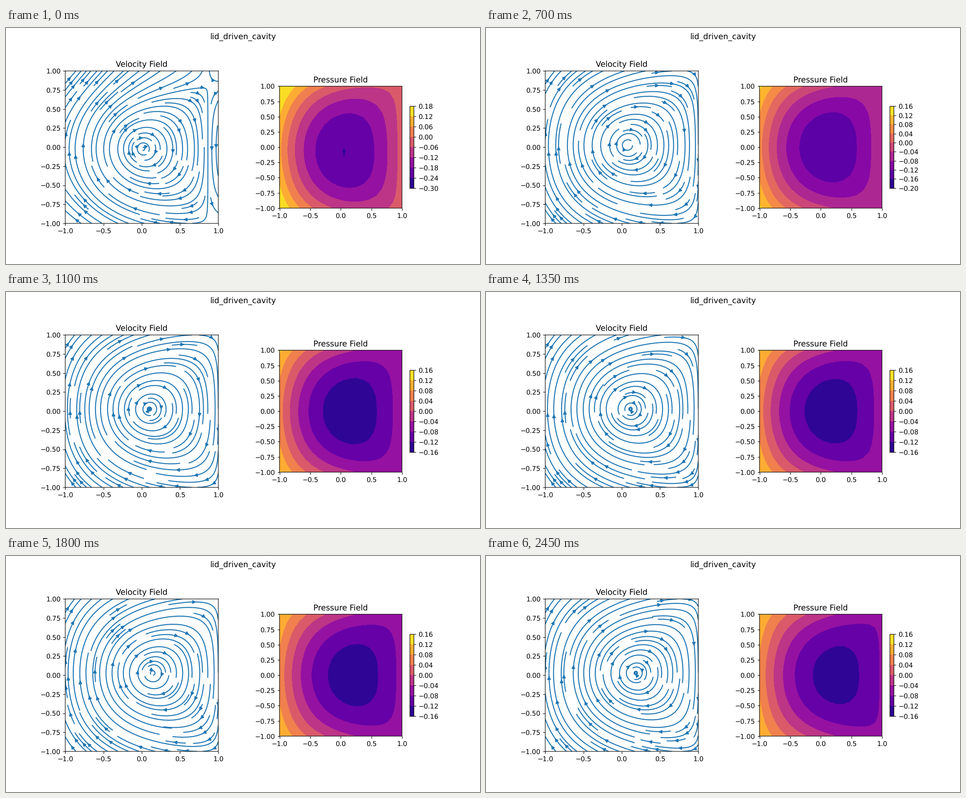
These frames come from a looping animation (1058x529 px, 2500 ms). A matplotlib script:

```python
import numpy as np
import matplotlib.pyplot as plt
from matplotlib.animation import FuncAnimation

FRAMES, INTERVAL = 50, 50
axis = np.linspace(-1, 1, 20)
X, Y = np.meshgrid(axis, axis)


def transient(t):
    """Start-up effect that dies out, t in seconds."""
    return np.exp(-t / .22)


def velocity(t):
    s = transient(t)
    cx = .03 + .062 * t - .013 * s
    cy = .028 - .05 * s
    wall = .26 + .49 * s
    ridge = cx + .6 * Y**2 + 1.1 * s * np.maximum(Y, 0)**4
    u = (Y - cy) * (1 + 1.15 * Y**2) * (1 - .68 * X**2 - wall * X**3)
    return u, ridge - X


def pressure(t):
    s = transient(t)
    depth = .156 - .0075 * t + .084 * s
    q = X - (.055 + .075 * t)
    midline = (.16 - .0165 * t + .095 * s) * q**2 - (.014 + .01 * s) * q**3
    rise = (1 - X) * (.128 - .008 * t + .057 * s + (.085 + .035 * s) * X)
    height = np.abs(Y)**(2.2 + .4 * X) + .11 * s * Y
    return midline - depth + rise * height


def contour_levels(t):
    if t < .15:
        low, step, bands = -.30, .06, 8
    elif t < .5:
        low, step, bands = -.20, .05, 8
    elif t <= .7:
        low, step, bands = -.20, .04, 9
    else:
        low, step, bands = -.16, .04, 8
    return np.round(low + step * np.arange(bands + 1), 2)


plt.rcParams["text.hinting"] = "none"
fig, (flow_ax, pressure_ax) = plt.subplots(1, 2, figsize=(10, 5), dpi=105.8)
fig.subplots_adjust(wspace=.4)
fig.suptitle("lid_driven_cavity")
for ax, name in ((flow_ax, "Velocity Field"), (pressure_ax, "Pressure Field")):
    ax.set(title=name, aspect="equal", xlim=(-1, 1), ylim=(-1, 1))
    ax.spines[:].set_snap(False)

drawn = {}


def clear():
    if drawn:
        drawn["bar"].remove()
        drawn["contours"].remove()
        drawn["streams"].lines.remove()
        for arrow in list(flow_ax.patches):
            arrow.remove()
        drawn.clear()


def update(frame):
    clear()
    t = frame * INTERVAL / 1000
    levels = contour_levels(t)
    p = np.clip(pressure(t), levels[0] + 1e-6, levels[-1] - 1e-6)
    drawn["streams"] = flow_ax.streamplot(axis, axis, *velocity(t), color="C0")
    drawn["contours"] = pressure_ax.contourf(X, Y, p, levels, cmap="plasma")
    drawn["bar"] = fig.colorbar(drawn["contours"], ax=pressure_ax, shrink=.45)
    for ax in (flow_ax, pressure_ax):
        ax.set(xlim=(-1, 1), ylim=(-1, 1))
    return []


animation = FuncAnimation(fig, update, frames=FRAMES, interval=INTERVAL,
                          init_func=lambda: [], repeat=True, repeat_delay=0)
plt.show()
```
